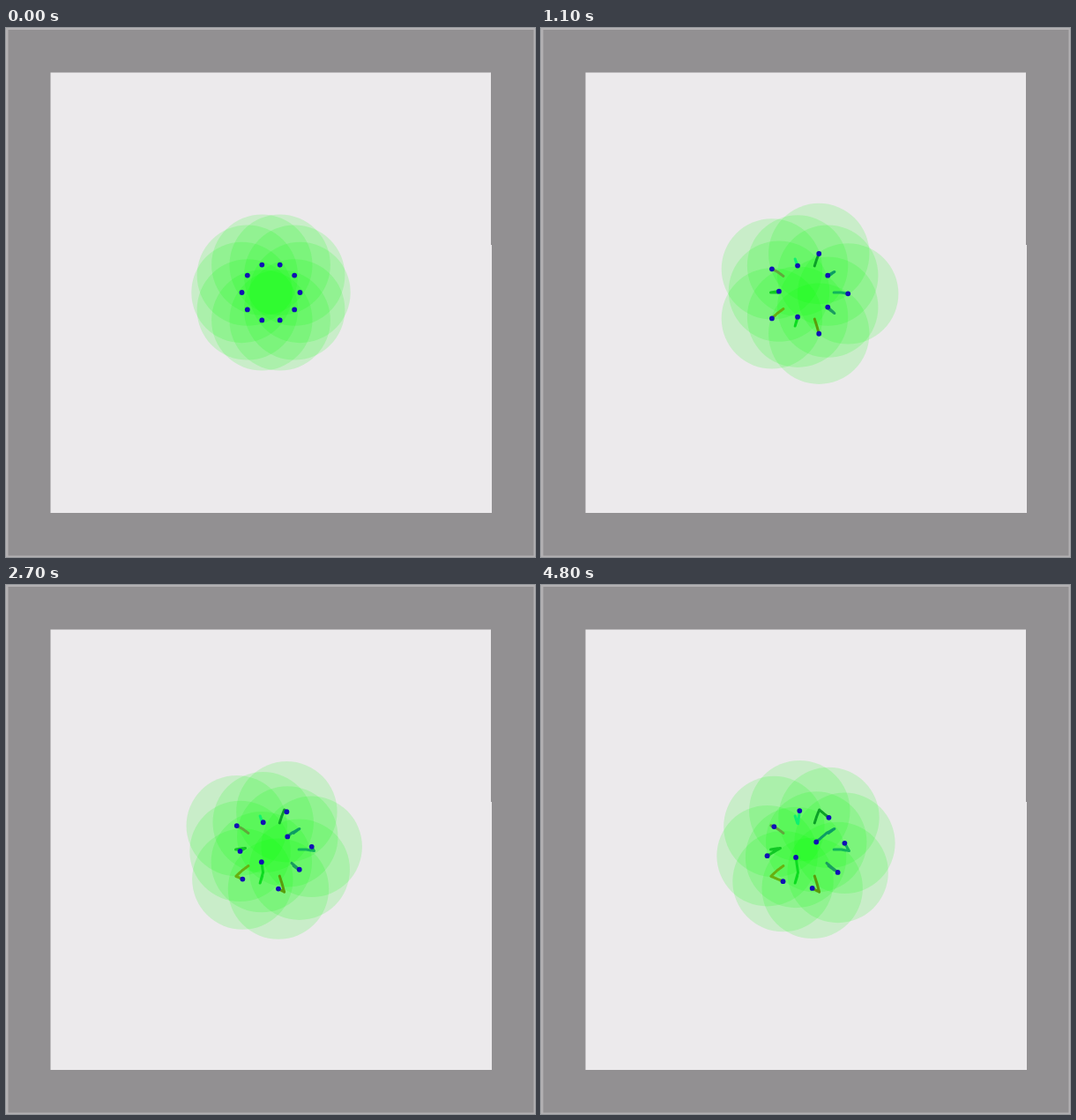
An HTML page with a canvas that plays this animation: 600 px wide and 600 px high, repeating every 4900 ms.

```html
<!DOCTYPE html>
<html lang="en">
<head>
<meta charset="utf-8">
<title>Drifting agents</title>
<style>
  html, body { margin: 0; width: 100%; height: 100%; overflow: hidden; }
  canvas { display: block; }
</style>
</head>
<body>
<canvas id="stage" width="600" height="600"></canvas>
<script>
const ctx = document.getElementById('stage').getContext('2d');
const STEP = 100, FRAMES = 49, COUNT = 10, RANGE = 57.2;
const colors = ['#12b45c', '#1a9c60', '#5a9c0c', '#0cdc20', '#68b010',
                '#10c824', '#60a83c', '#10f070', '#0ca028', '#0c9c64'];

const polar = (r, degrees, dy = 0) => {
  const a = degrees * Math.PI / 180;
  return [300.5 + r * Math.cos(a), 300 + dy + r * Math.sin(a)];
};
const ring = (i, r) => polar(r, 36 * i);

// Even agents form an outer pentagon, odd ones an inner pentagon.
const pentagons = i => i % 2 ? polar(29, 36 * i, -1.6) : polar(49, 36 * i, 1.6);

// Two opposite agents end up inside an octagon made by the other eight.
function octagon(i) {
  if (i % 6 === 3) return polar(14.5, 36 * i + 34 - (i > 3 ? 34 : 0));
  const slot = i > 3 ? i - 1 : i;
  return polar(44.5, 45 * slot - 9.3);
}

function mix([x, y], [u, v], p) {
  p = Math.min(1, Math.max(0, p));
  return [x + (u - x) * p, y + (v - y) * p];
}

function position(i, t) {
  if (t < 500) return ring(i, 33 + 7 * t / 500);
  if (t < 1900) return mix(ring(i, 40), pentagons(i), (t - 500) / 700);
  // The last move spreads around the ring, starting at agent 2.
  const gap = Math.abs(i - 2), lag = 140 * Math.min(gap, COUNT - gap);
  return mix(pentagons(i), octagon(i), (t - 1900 - lag) / 950);
}

const paths = Array.from({ length: COUNT }, (_, i) =>
  Array.from({ length: FRAMES }, (_, n) => position(i, n * STEP)));

function rect(color, x, y, right, bottom) {
  ctx.fillStyle = color;
  ctx.fillRect(x, y, right - x, bottom - y);
}

function disc([x, y], r, color) {
  ctx.fillStyle = color;
  ctx.beginPath();
  ctx.arc(x, y, r, 0, 2 * Math.PI);
  ctx.fill();
}

function trail(i, n) {
  ctx.strokeStyle = colors[i];
  ctx.beginPath();
  ctx.moveTo(...ring(i, 31.6));
  for (const point of paths[i].slice(0, n + 1)) ctx.lineTo(...point);
  ctx.stroke();
}

function draw(n) {
  rect('#b3b1b3', 0, 0, 600, 600);
  rect('#929092', 2.5, 2, 598.5, 598.5);
  rect('#eceaec', 50.5, 50.5, 550, 550);
  rect('#eceaec', 550, 246, 551, 550);
  paths.forEach(path => disc(path[n], RANGE, 'rgba(0, 255, 0, 0.15)'));
  ctx.lineWidth = 3;
  ctx.lineCap = ctx.lineJoin = 'round';
  paths.forEach((_, i) => trail(i, n));
  paths.forEach(path => disc(path[n], 2.9, '#1010b4'));
}

const start = performance.now();
function tick() {
  draw(Math.floor((performance.now() - start) / STEP) % FRAMES);
  requestAnimationFrame(tick);
}
tick();
</script>
</body>
</html>
```
